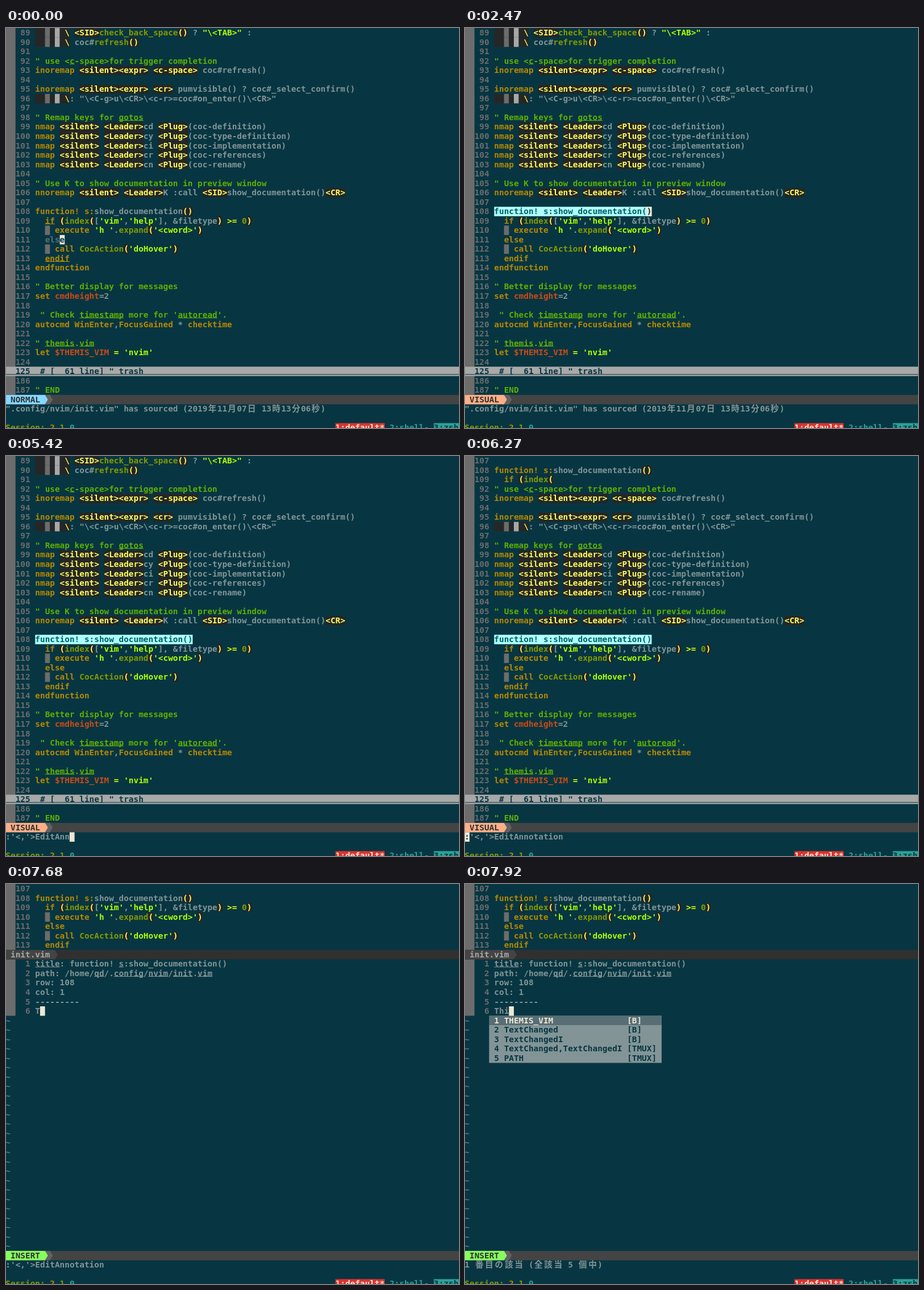
An HTML page with a canvas for the animation above (8000 ms loop, 797 px wide and 703 px high).

```html
<!DOCTYPE html>
<html lang="en">
<head>
<meta charset="utf-8">
<title>Editor session</title>
<style>
html, body { margin: 0; width: 100%; height: 100%; overflow: hidden; background: #073642; }
canvas { display: block; }
</style>
</head>
<body>
<canvas id="stage" width="797" height="703"></canvas>
<script>
const ctx = document.getElementById('stage').getContext('2d');
const LOOP = 8000, W = 797, H = 703;
const CELL = 8.66, LEFT = -0.65, ROW = 16.53, TOP = 0.15;
const BASELINE = 13, UNDERLINE = 13.1;
const MONO = 'bold 14.384px "DejaVu Sans Mono", monospace';
const WIDE = 'bold 14.6px "Noto Sans CJK JP", "Noto Sans CJK", sans-serif';
const BG = '#073642', GREY = '#6c6c6c', CREAM = '#eee8d5';

// Text styles: [colour, background, underlined]
const STYLE = {
  g: ['#839496'],
  G: ['#839496', null, true],
  y: ['#b58900'],
  Y: ['#b58900', null, true],
  o: ['#859900'],
  s: ['#afff00'],
  e: ['#d7ff00'],
  p: ['#ffff5f', '#262626'],
  c: ['#5faf00'],
  C: ['#5faf00', null, true],
  r: ['#cb4b16'],
  x: ['#586e75'],
  n: [GREY],
  d: [BG, '#262626'],
  m: [BG, GREY],
  l: [BG, '#a8a8a8'],
  t: ['#5c7590'],
  v: ['#005f5f', '#afffff'],
  f: [BG],
  q: [BG, '#839496'],
  Q: [CREAM, '#586e75'],
  w: ['#a8a8a8'],
  R: [CREAM, '#dc322f'],
  a: ['#2aa198'],
  A: [BG, '#2aa198'],
  b: ['#303030']
};

// The letter after each § selects a style.
const SOURCE = String.raw`§d  §m §d §l §d §p\§g §p<SID>§ocheck_back_space§p()§g ? §s"\<TAB>"§g :
§d  §m §d §l §d §p\§g coc#§orefresh§p()

§c" use <§Cc§c-space>for trigger completion
§yinoremap §p<silent><expr>§g §p<c-space>§g coc#refresh()

§yinoremap §p<silent><expr>§g §p<cr>§g pumvisible() ? coc#_select_confirm()
§d  §m §d §l §d §p\§g: "\<C-g>u\<CR>\<c-r>=coc#on_enter()\<CR>"

§c" Remap keys for §Cgotos
§ynmap §p<silent>§g §p<Leader>§gcd §p<Plug>§g(coc-definition)
§ynmap §p<silent>§g §p<Leader>§gcy §p<Plug>§g(coc-type-definition)
§ynmap §p<silent>§g §p<Leader>§gci §p<Plug>§g(coc-implementation)
§ynmap §p<silent>§g §p<Leader>§gcr §p<Plug>§g(coc-references)
§ynmap §p<silent>§g §p<Leader>§gcn §p<Plug>§g(coc-rename)

§c" Use K to show documentation in preview window
§ynnoremap §p<silent>§g §p<Leader>§gK :call §p<SID>§gshow_documentation()§p<CR>

§yfunction§y! s:§gshow_documentation§p()
§g  §yif§g §p(§oindex§p(§g[§s'vim'§g,§s'help'§g], &filetype§p)§g §e>=§g §o0§p)
§g  §m §g §yexecute§g §s'h '§g.§oexpand§p(§s'<cword>'§p)
§g  §yelse
§g  §m §g §ycall§g §oCocAction§p(§s'doHover'§p)
§g  §yendif
§yendfunction

§c" Better display for messages
§yset §rcmdheight§g=2

§c " Check §Ctimestamp§c more for '§Cautoread§c'.
§yautocmd WinEnter§g,§yFocusGained§g * §ychecktime

§c" §Cthemis§c.§Cvim
§ylet §r$THEMIS_VIM§g §e=§g §s'nvim'
`.split('\n');

const NOTE = [
  '§Gtitle§g: function! §Gs§g:show_documentation()',
  '§gpath: /home/§Gqd§g/.§Gconfig§g/§Gnvim§g/§Ginit§g.§Gvim',
  '§grow: 108',
  '§gcol: 1',
  '§g---------'
];
const MENU = [
  ['THEMIS_VIM', '[B]'], ['TextChanged', '[B]'], ['TextChangedI', '[B]'],
  ['TextChanged,TextChangedI', '[TMUX]'], ['PATH', '[TMUX]']
];

const COMMAND = 'EditAnnotation';
const KEY_TIMES = [4480, 4640, 4720, 4870, 5100, 5340, 5420, 5570];
// [time, row, column]
const CURSOR = [
  [0, 22, 11], [760, 20, 26], [920, 19, 26], [1290, 18, 6], [1610, 19, 26],
  [1690, 19, 6], [2470, 19, 37], [2850, 19, 36], [3310, 19, 37], [3710, 40, 6],
  [6200, 40, 0], [6360, 8, 6], [6900, 12, 6], [7130, 13, 6], [7680, 13, 7],
  [7750, 13, 8], [7920, 13, 9]
];

let cells = {};
const xAt = col => LEFT + col * CELL;
const yAt = row => TOP + row * ROW;
const isWide = ch => /[\u3000-\u9fff]/.test(ch);

function box(row, from, to, color, rows = 1) {
  ctx.fillStyle = color;
  ctx.fillRect(xAt(from), yAt(row), xAt(to) - xAt(from), rows * ROW);
}

const bar = (row, color) => box(row, -1, 94, color);
const signColumn = (row, rows) => box(row, -1, 2, GREY, rows);

function underline(row, from, to, color) {
  ctx.fillStyle = color;
  ctx.fillRect(xAt(from), yAt(row) + UNDERLINE, xAt(to) - xAt(from), 1);
}

function glyph(row, col, ch, color) {
  ctx.font = isWide(ch) ? WIDE : MONO;
  ctx.fillStyle = color;
  ctx.fillText(ch, xAt(col) + (isWide(ch) ? 1.3 : 0), yAt(row) + BASELINE);
}

function put(row, col, text, key) {
  const [color, back, line] = STYLE[key];
  let end = col;
  for (const ch of text) end += isWide(ch) ? 2 : 1;
  if (back) box(row, col, end, back);
  if (line) underline(row, col, end, color);
  for (const ch of text) {
    cells[row + ',' + col] = ch;
    if (ch !== ' ') glyph(row, col, ch, color);
    col += isWide(ch) ? 2 : 1;
  }
  return end;
}

function rich(row, col, marked) {
  for (const part of marked.split('§').slice(1)) col = put(row, col, part.slice(1), part[0]);
}

function codeLine(row, number, marked) {
  put(row, 2, String(number).padStart(3), 'n');
  rich(row, 6, marked);
}

function arrow(row, col, color) {
  const x = xAt(col), top = yAt(row), bottom = yAt(row + 1);
  ctx.fillStyle = color;
  ctx.beginPath();
  ctx.moveTo(x - 0.5, top);
  ctx.lineTo(x, top);
  ctx.lineTo(x + 5, (top + bottom) / 2);
  ctx.lineTo(x, bottom);
  ctx.lineTo(x - 0.5, bottom);
  ctx.fill();
}

function modeLine(mode, color) {
  bar(39, '#444444');
  box(39, 8, 9, '#626262');
  arrow(39, 9, '#626262');
  box(39, -1, 8, color);
  arrow(39, 8, color);
  put(39, 1, mode, 'b');
}

// Highlight the block keywords that belong to the word under the cursor.
function matched(line, i, t) {
  if (t < 760) {
    if (i === 20) return line.replace('§yif', '§Yif');
    if (i === 22) return line.replace('§y', '§x');
    if (i === 24) return line.replace('§y', '§Y');
  }
  if (t >= 1690 && t < 2470) {
    if (i === 19) return line.replace('§y', '§x');
    if (i === 25) return line.replace('§y', '§Y');
  }
  return line;
}

function drawSource(t) {
  signColumn(-1, 40);
  SOURCE.forEach((line, i) => {
    const redrawn = t >= 6270 && i < 3;
    if (!redrawn) codeLine(i, 89 + i, matched(line, i, t));
  });
  bar(36, '#a8a8a8');
  put(36, 2, '125  # [  61 line] " trash', 'f');
  underline(36, -1, 94, BG);
  codeLine(37, 186, '');
  codeLine(38, 187, '§c" END');
  if (t >= 2470) {
    const length = t >= 2850 && t < 3310 ? 31 : 32;
    put(19, 6, 'function! s:show_documentation()'.slice(0, length), 'v');
  }
  if (t >= 6270) {
    codeLine(0, 107, '');
    codeLine(1, 108, SOURCE[19]);
    codeLine(2, 109, '§g  §yif§g §p(§oindex§p(');
  }
}

function drawSplit(t) {
  const inserting = t >= 7130;
  signColumn(-1, 8);
  signColumn(8, inserting ? 6 : 5);
  for (let i = 0; i < 7; i++) codeLine(i, 107 + i, SOURCE[18 + i]);
  bar(7, '#303030');
  box(7, -1, 10, '#444444');
  arrow(7, 10, '#444444');
  put(7, 1, 'init.vim', 'w');
  NOTE.forEach((line, i) => codeLine(8 + i, i + 1, line));
  if (inserting) {
    const typed = t < 7680 ? 0 : t < 7750 ? 1 : t < 7920 ? 2 : 3;
    codeLine(13, 6, '§g' + 'Thi'.slice(0, typed));
  }
  for (let row = inserting ? 14 : 13; row < 39; row++) put(row, 0, '~', 't');
  if (t >= 7840) {
    box(14, 5, 40, '#839496', MENU.length);
    MENU.forEach(([word, kind], i) => {
      const text = ` ${i + 1} ${word}`.padEnd(28) + kind;
      put(14 + i, 5, text.padEnd(35), i ? 'q' : 'Q');
    });
  }
}

function typedCount(t) {
  return t >= 5740 ? COMMAND.length : KEY_TIMES.filter(k => t >= k).length;
}

function drawMessage(t) {
  if (t < 3710) {
    put(40, 0, '".config/nvim/init.vim" has sourced (2019年11月07日 13時13分06秒)', 'g');
  } else if (t < 7920) {
    put(40, 0, ":'<,'>" + COMMAND.slice(0, typedCount(t)), 'g');
  } else {
    put(40, 0, '1 番目の該当 (全該当 5 個中)', 'g');
  }
}

function drawSession() {
  rich(42, 0, '§oSession: §y2 §o1 §a0');
  put(42, 67, '1:default*', 'R');
  put(42, 78, '2:shell-', 'a');
  put(42, 87, '3:zsh ', 'A');
}

function drawCursor(t) {
  let [, row, col] = CURSOR.filter(k => t >= k[0]).pop();
  if (t >= 3710 && t < 6200) col += typedCount(t);
  box(row, col, col + 1, CREAM);
  const ch = cells[row + ',' + col];
  if (ch && ch !== ' ') glyph(row, col, ch, BG);
}

function draw(t) {
  cells = {};
  ctx.fillStyle = BG;
  ctx.fillRect(0, 0, W, H);
  if (t < 6360) drawSource(t);
  else drawSplit(t);
  if (t >= 7130) modeLine('INSERT', '#87ff5f');
  else if (t >= 1840 && t < 6360) modeLine('VISUAL', '#ffaf87');
  else modeLine('NORMAL', '#87d7ff');
  drawMessage(t);
  drawSession();
  drawCursor(t);
}

const start = performance.now();
function tick() {
  draw((performance.now() - start) % LOOP);
  requestAnimationFrame(tick);
}
tick();
</script>
</body>
</html>
```
